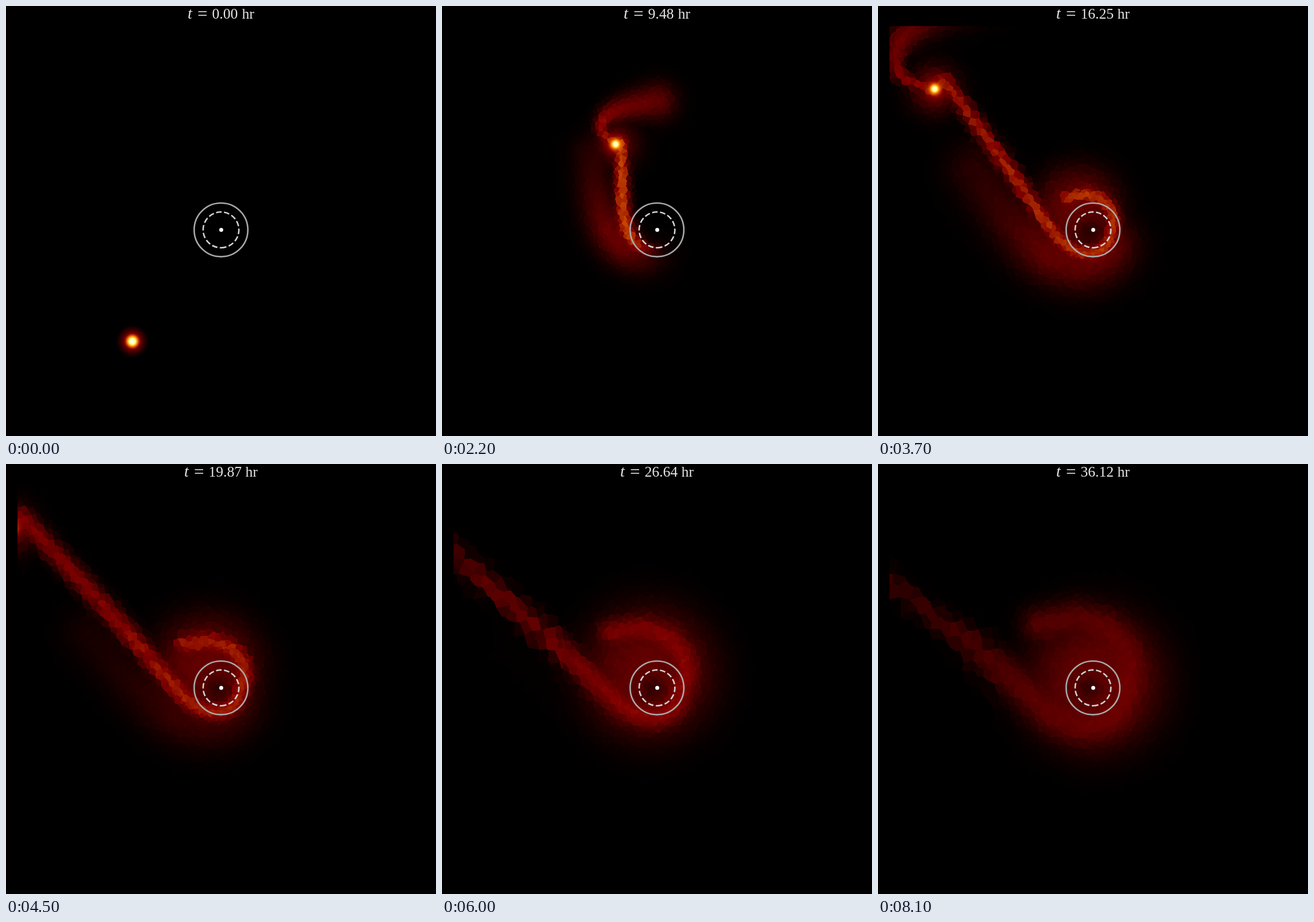
Write an HTML page with a canvas that moves like this. It is 748 by 748 pixels and loops after 8200 ms.

```html
<!DOCTYPE html>
<html lang="en">
<head>
<meta charset="utf-8">
<title>Tidal disruption</title>
<style>
html, body { margin: 0; width: 100%; height: 100%; overflow: hidden; background: #000; }
canvas { display: block; }
</style>
</head>
<body>
<canvas id="stage" width="748" height="748"></canvas>
<script>
const ctx = document.getElementById('stage').getContext('2d');
const LEFT = 20, TOP = 35, W = 540, H = 580;   // painted part of the plot
const CX = 374, CY = 389, PERI = 46.6;         // black hole, pericentre distance
const LOOP = 8200, STEP = 100, HOURS = 0.4515;
const DEG = Math.PI / 180;
const image = ctx.createImageData(W, H);
const clamp = (v, a = 0, b = 1) => Math.min(b, Math.max(a, v));
const mix = (a, b, f) => a + (b - a) * f;
const polar = (r, deg) => ({ x: CX + r * Math.cos(deg * DEG), y: CY - r * Math.sin(deg * DEG) });
const curve = (n, at) => Array.from({ length: n + 1 }, (_, i) => at(i / n));

// Parabolic orbit, solved in closed form
function orbit(k) {
  const m = 0.3825 * k - 5.07;
  const d = 2 * Math.sinh(Math.asinh(1.5 * m) / 3);
  const r = PERI * (1 + d * d), angle = 2 * Math.atan(d) / DEG;
  return { ...polar(r, angle), r, angle };
}

// Everything the gas needs at one step
function gasAt(k) {
  const star = orbit(k), torn = clamp((k - 10) / 4), age = Math.max(0, k - 52);
  const ribbons = torn ? [arm(k, star, torn), tail(k, star, torn), fan(k, star, torn)] : [];
  const grow = clamp((k - 28) / 24);
  const disk = {
    x: mix(345, 352, grow) + 0.9 * age,
    y: mix(350, 358, grow) + 0.7 * age,
    size: mix(55, 112, grow) + 0.25 * age,
    v: 0.19 * clamp((k - 28) / 8)
  };
  return { star, torn, disk, ribbons: ribbons.map(segments) };
}

// The bound stream falls along a hyperbola in (angle, radius), then spirals out again
const SPREAD = 2800, LAG = 3.5;
const innerRadius = k => 20 + Math.max(0, k - 50) * 0.8;
const headAngle = k => Math.min(95 + 24 * (k - 13), 490);
const headFade = (k, angle) => k > 32 ? 1 : clamp((headAngle(k) - angle) / 80);
function streamRadius(k, star, angle) {
  const inner = innerRadius(k);
  const limit = star.angle - SPREAD / (star.r - inner) - LAG;
  return inner + SPREAD / (angle - limit) +
    Math.max(0, angle - 360) * clamp((k - 22) * 0.025, 0, 0.7);
}
const fading = (k, life) => Math.exp(-Math.max(0, k - 28) / life);

function arm(k, star, torn) {
  const start = star.angle - LAG, end = headAngle(k);
  const points = curve(30, u => {
    const angle = mix(start, end, u ** 2.4);
    const r = streamRadius(k, star, angle);
    const near = clamp((300 - r) / 250);
    return {
      ...polar(r, angle),
      w: mix(clamp(k * 0.4, 9, 18), 15 + Math.max(0, k - 36) * 0.6, near),
      v: mix(0.34 * fading(k, 46), 0.38 * fading(k, 75), near) * torn * headFade(k, angle)
    };
  });
  return [{ ...points[0], x: star.x, y: star.y }, ...points];
}

// The unbound tail curls away in the frame of the star
function tail(k, star, torn) {
  const scale = (k - 5) / 23;
  const ex = (star.x - CX) / star.r, ey = (star.y - CY) / star.r;
  return curve(14, s => {
    const out = 75 * scale * Math.sin(2.4 * s);
    const side = scale * (271 * s * s - 130 * s);
    return {
      x: star.x + ex * out - ey * side,
      y: star.y + ey * out + ex * side,
      w: 10 + 32 * s * s * scale,
      v: 0.33 * (1 - 0.45 * s) * torn * fading(k, 46)
    };
  });
}

// Thin gas outside the bend of the stream
function fan(k, star, torn) {
  const reach = 0.85 * clamp((k - 12) / 8);
  const peak = 0.23 * torn * Math.exp(-(((k - 28) / 18) ** 2));
  return curve(14, s => {
    const angle = star.angle + 15 + 160 * s;
    return {
      ...polar(streamRadius(k, star, angle) * (1 + reach * (1 - 0.85 * s)), angle),
      w: Math.min(48, 1.6 * k),
      v: peak * Math.min(1, 0.4 + 2 * s) * headFade(k, angle)
    };
  });
}

function segments(points) {
  return points.slice(1).map((q, i) => {
    const p = points[i], dx = q.x - p.x, dy = q.y - p.y;
    return { p, q, dx, dy, len: dx * dx + dy * dy || 1 };
  });
}

function density({ star, torn, disk, ribbons }, x, y) {
  let sum = 0;
  for (const ribbon of ribbons) {
    let best = 0;
    for (const { p, q, dx, dy, len } of ribbon) {
      const ex = x - p.x, ey = y - p.y;
      const t = clamp((ex * dx + ey * dy) / len);
      const w = mix(p.w, q.w, t);
      const d = ((ex - t * dx) ** 2 + (ey - t * dy) ** 2) / (w * w);
      if (d < 5) best = Math.max(best, mix(p.v, q.v, t) * Math.exp(-d));
    }
    sum += best ** 4;
  }
  const far = Math.hypot(x - disk.x, y - disk.y) / disk.size;
  sum += (disk.v * Math.exp(-(far ** 3))) ** 4;
  const cloud = ((x - star.x) ** 2 + (y - star.y) ** 2) / 1500;
  sum += (0.22 * torn * clamp(star.r / 150 - 0.3) * Math.exp(-cloud)) ** 4;
  const hole = ((x - CX + 8) ** 2 + (y - CY) ** 2) / 450;
  return Math.sqrt(Math.sqrt(sum)) * (1 - 0.5 * Math.exp(-hole));
}

// Irregular cells: jittered sites, and the nearest site of every pixel
let seed = 7;
const random = () => (seed = (seed * 16807) % 2147483647) / 2147483647;
function mesh(size) {
  const cols = Math.ceil(W / size) + 2, rows = Math.ceil(H / size) + 2;
  const sites = [], near = new Uint16Array(W * H);
  for (let i = 0; i < cols * rows; i++) {
    sites.push({
      x: (i % cols - 1 + random()) * size,
      y: (Math.floor(i / cols) - 1 + random()) * size,
      gain: 0.95 + 0.1 * random()
    });
  }
  for (let y = 0; y < H; y++) for (let x = 0; x < W; x++) {
    const col = Math.floor(x / size) + 1, row = Math.floor(y / size) + 1;
    let best = 1e9;
    for (let r = row - 1; r <= Math.min(rows - 1, row + 1); r++) {
      for (let c = col - 1; c <= Math.min(cols - 1, col + 1); c++) {
        const s = sites[r * cols + c], d = (s.x - x) ** 2 + (s.y - y) ** 2;
        if (d < best) { best = d; near[y * W + x] = r * cols + c; }
      }
    }
  }
  return { sites, near };
}
const meshes = [7, 10, 18].map(mesh);

// Cells coarsen as the gas thins out
function cellLevel(k, x, y) {
  if (k < 32) return 0;
  if (k > 45 && x < 210) return 2;
  return (x - CX) ** 2 + (y - CY) ** 2 < 5200 ? 0 : 1;
}

function starLight(k, torn, dx, dy) {
  const stretch = 0.55 * Math.exp(-(((k - 13.5) / 2) ** 2));
  const along = dx * 0.8 + dy * 0.6;
  const rr = dx * dx + dy * dy - stretch * along * along;
  if (rr > 2500) return 0;
  const halo = mix(0.2 * Math.max(0, 1 - rr / 784), 0.37 * Math.exp(-rr / 450), torn);
  return halo + mix(0.78, 0.57, torn) * Math.exp(-rr / mix(90, 46, torn));
}

function paintGas(k) {
  const gas = gasAt(k), { star, torn } = gas;
  const levels = meshes.map(({ sites }, n) => k < 32 && n ? [] :
    sites.map(s => s.gain * density(gas, s.x + LEFT, s.y + TOP)));
  for (let i = 0; i < W * H; i++) {
    const x = i % W + LEFT, y = Math.floor(i / W) + TOP;
    const n = cellLevel(k, x, y);
    const cell = levels[n][meshes[n].near[i]];
    const light = starLight(k, torn, x - star.x, y - star.y);
    const v = light ? Math.sqrt(Math.sqrt(cell ** 4 + light ** 4)) : cell;
    for (let c = 0; c < 3; c++) image.data[i * 4 + c] = 255 * (2 * v - c / 2);
    image.data[i * 4 + 3] = 255;
  }
  ctx.putImageData(image, LEFT, TOP);
}

function ring(r, color, dash) {
  ctx.strokeStyle = color;
  ctx.lineWidth = 2.6;
  ctx.setLineDash(dash);
  ctx.beginPath();
  ctx.arc(CX, CY + 0.4, r, Math.PI / 2, -1.5 * Math.PI, true);
  ctx.stroke();
}

function label(text, x, y, font) {
  ctx.font = font + ' "Liberation Serif", serif';
  ctx.fillText(text, x, y);
}

function draw(k) {
  ctx.fillStyle = '#000';
  ctx.fillRect(0, 0, 748, 748);
  paintGas(k);
  ring(46.7, '#aaa', []);
  ring(31.1, '#d3d3d3', [9.62, 4.16]);
  ctx.fillStyle = '#fff';
  ctx.beginPath();
  ctx.arc(CX + 0.4, CY + 0.4, 3.4, 0, 2 * Math.PI);
  ctx.fill();
  const hours = (k * HOURS).toFixed(2), shift = hours.length > 4 ? 6 : 0;
  ctx.fillStyle = '#e6e6e6';
  label('t', 316 - shift, 22, 'italic 28px');
  label('=', 333 - shift, 24, '31px');
  label(hours, 358.5 - shift, 22, '25.5px');
  label('hr', 410.5 + shift, 22, '25.5px');
}

let shown = -1;
function tick() {
  const k = Math.max(0, Math.floor(performance.now() % LOOP / STEP) - 1);
  if (k !== shown) draw(shown = k);
  requestAnimationFrame(tick);
}
tick();
</script>
</body>
</html>
```
